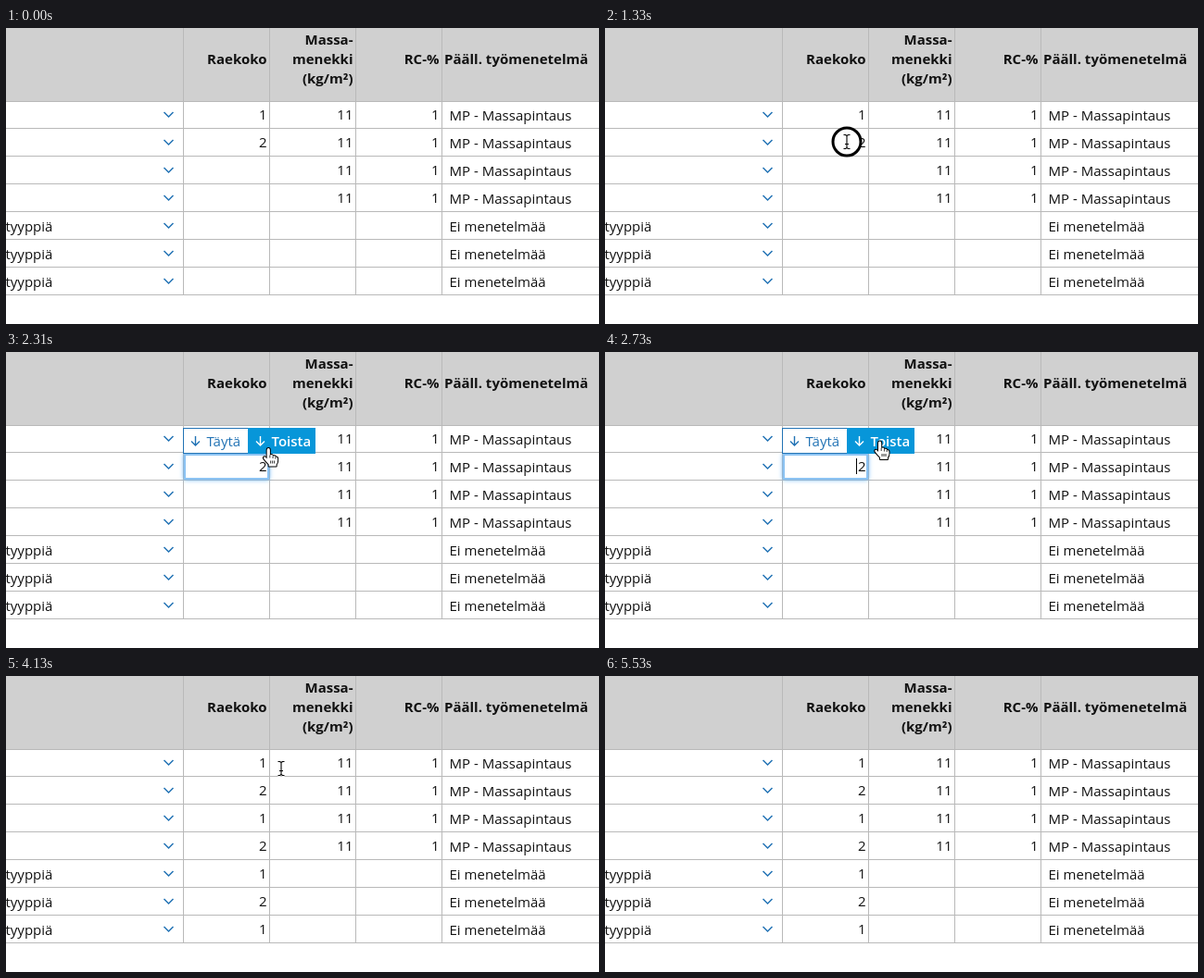
An HTML page with a canvas that plays this animation: 640 by 320 pixels, repeating every 5600 ms.

```html
<!DOCTYPE html>
<html lang="fi">
<head>
<meta charset="utf-8">
<style>
  html, body { margin: 0; width: 100%; height: 100%; overflow: hidden; background: #fff; }
  canvas { display: block; }
</style>
</head>
<body>
<canvas id="stage" width="640" height="320"></canvas>
<script>
const ctx = document.getElementById('stage').getContext('2d');
const LOOP = 5600, STEP = 70, ROW = 30, ROWS = 7;
const BLUE = '#2273b5', LINE = '#b9b9b9';
const COLUMNS = [191, 284, 377, 470];
const POPUP_AT = 1470, FILL_AT = 3220;

// Cursor waypoints: time, x, y
const TRACK = [
  [280, 178, 332], [490, 216, 240], [770, 253, 163], [1190, 261, 123], [1890, 261, 123],
  [1960, 265, 118], [2590, 297, 100], [4060, 297, 100], [4130, 297, 100], [4900, 340, 345]
];

const ARROW = new Path2D('M0 0V14.5L3.3 11.5L5.8 17L8.3 16L5.9 10.7H10.3Z');
const HAND = new Path2D('M-2 8V-1.5Q-2-3.5-.4-3.5T1.2-1.5V4Q4 2.8 4.4 5Q7 4 7.2 6Q9.5 5.5 9.5 8' +
  'V10Q9.5 12.5 8 14V16H0V14Q-3.5 10.5-5.6 7.6Q-6.2 5.8-4.5 5.8Q-3.2 6-2 8Z');
const BEAM = new Path2D('M-3.5-7.5H-1.5L0-6.5L1.5-7.5H3.5M-3.5 7.5H-1.5L0 6.5L1.5 7.5H3.5M0-6.5V6.5M-2 2.5H2');

function text(str, x, y, align = 'left', color = '#111', weight = 400) {
  ctx.font = `${weight} 15px "Open Sans", sans-serif`;
  ctx.textAlign = align;
  ctx.fillStyle = color;
  ctx.fillText(str, x, y);
}

function rect(x, y, w, h, color) {
  ctx.fillStyle = color;
  ctx.fillRect(x, y, w, h);
}

function stroke(path, color, width) {
  ctx.strokeStyle = color;
  ctx.lineWidth = width;
  ctx.stroke(path);
}

function drawTable(filled) {
  rect(0, 0, 640, 320, '#fff');
  rect(0, 0, 640, 79, '#d0d0d0');
  for (const x of COLUMNS) rect(x, 0, 1, 289, LINE);
  rect(0, 79, 640, 1, LINE);

  const header = (str, x, y, align = 'right') => text(str, x, y, align, '#111', 700);
  header('Raekoko', 281.5, 39);
  ['Massa-', 'menekki', '(kg/m²)'].forEach((str, i) => header(str, 374.5, 18 + i * 21));
  header('RC-%', 467.5, 39);
  header('Pääll. työmenetelmä', 473, 39, 'left');

  for (let i = 0; i < ROWS; i++) {
    const y = 99 + i * ROW, paved = i < 4;
    rect(0, y + 9, 640, 1, LINE);
    stroke(new Path2D(`M170.5 ${y - 8}l5 5l5-5`), BLUE, 1.5);
    if (i < 2 || filled) text(1 + i % 2, 281.5, y, 'right');
    if (paved) {
      text('11', 374.5, y, 'right');
      text('1', 467.5, y, 'right');
    } else {
      text('tyyppiä', -0.5, y + 1);
    }
    text(paved ? 'MP - Massapintaus' : 'Ei menetelmää', 478.5, y + 1);
  }
}

function drawButton(label, x, w, hover) {
  rect(x, 82, w, 28, hover ? '#0796d9' : BLUE);
  if (!hover) rect(x + 1, 83, w - 2, 26, '#fff');
  const color = hover ? '#fff' : BLUE;
  stroke(new Path2D(`M${x + 13.5} 91v10m-4.5-4.5l4.5 4.5l4.5-4.5`), color, 1.4);
  text(label, x + 25.5, 102, 'left', color, hover ? 600 : 400);
}

function drawEditor(t, hover) {
  ctx.save();
  ctx.shadowColor = '#5aaef5';
  ctx.shadowBlur = 5;
  rect(192, 110, 92, 28, '#8cc3f3');
  ctx.restore();
  rect(194, 112, 88, 24, '#fff');
  text('2', 281.5, 129, 'right');
  if ((t - POPUP_AT) % 1000 < 500) rect(271, 115, 1, 17, '#000');
  drawButton('Täytä', 191, 71, false);
  drawButton('Toista', 261, 73, hover);
}

function drawClick(t, start, x, y) {
  const p = (t - start) / 350;
  if (p < 0 || p >= 1) return;
  ctx.globalAlpha = Math.min(1, 2 - 2 * p);
  ctx.beginPath();
  ctx.arc(x, y, 11 + 4 * Math.min(1, p * 5), 0, 7);
  ctx.fillStyle = '#fff';
  ctx.fill();
  ctx.strokeStyle = '#000';
  ctx.lineWidth = 3;
  ctx.stroke();
  ctx.globalAlpha = 1;
}

function cursorAt(t) {
  const i = TRACK.findIndex(point => point[0] > t);
  if (i < 1) return null;
  const [t0, x0, y0] = TRACK[i - 1], [t1, x1, y1] = TRACK[i];
  let p = (t - t0) / (t1 - t0);
  if (t >= 770 && t < 1190) p = 1 - (1 - p) ** 2;
  if (t >= 1960) p = p * p * (3 - 2 * p);
  return [x0 + (x1 - x0) * p, y0 + (y1 - y0) * p];
}

function drawCursor(kind, x, y) {
  ctx.save();
  ctx.translate(x, y);
  ctx.lineJoin = 'round';
  if (kind === 'beam') {
    stroke(BEAM, '#fff', 2.5);
    stroke(BEAM, '#000', 1.1);
  } else {
    const hand = kind === 'hand', path = hand ? HAND : ARROW;
    stroke(path, hand ? '#000' : '#fff', 2);
    ctx.fillStyle = hand ? '#fff' : '#000';
    ctx.fill(path);
    if (hand) stroke(new Path2D('M1.2 4V7M4.4 5V7.5M7.2 6V8M2 10v3m2-3v3m2-3v3'), '#000', 0.8);
  }
  ctx.restore();
}

function draw(now) {
  const t = Math.floor(now % LOOP / STEP) * STEP;
  const editing = t >= POPUP_AT && t < FILL_AT;
  const pos = cursorAt(t);
  const hover = editing && t >= 1960 && pos[1] < 110;

  drawTable(t >= FILL_AT);
  if (editing) drawEditor(t, hover);
  drawClick(t, 1260, 261, 123);
  drawClick(t, 3080, 297, 100);
  if (pos) drawCursor(hover ? 'hand' : editing && t >= 1960 ? 'arrow' : 'beam', ...pos);
}

const start = performance.now();
function tick() {
  draw(performance.now() - start);
  requestAnimationFrame(tick);
}
tick();
</script>
</body>
</html>
```
